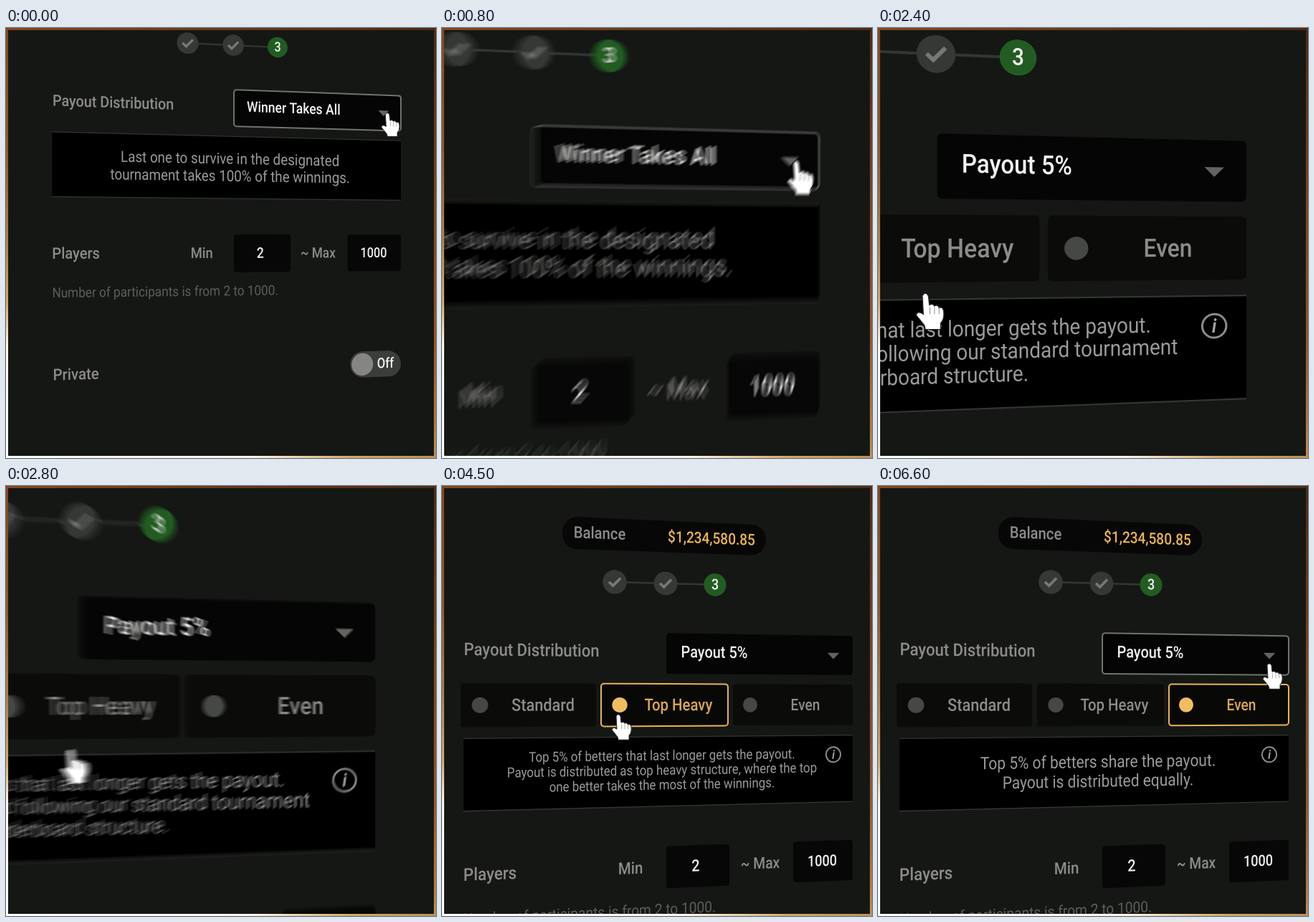
An HTML page with a canvas that plays this animation: 600x600 px, repeating every 6.7 s.

```html
<!DOCTYPE html>
<html lang="en">
<head>
<meta charset="utf-8">
<title>Payout settings</title>
<style>
html, body { margin: 0; height: 100%; overflow: hidden; background: #151714; }
canvas { display: block; }
</style>
</head>
<body>
<canvas id="stage" width="600" height="600"></canvas>
<script>
const LOOP = 6700, SHUTTER = 32, SAMPLES = 12;
const TILT = 0.00017, CONDENSE = 0.88;
const GOLD = '#e9b355', GREY = '#8c8c8a', WHITE = '#f2f2f0';

const out = document.getElementById('stage').getContext('2d');
const buffer = document.createElement('canvas');
buffer.width = buffer.height = 600;
const c = buffer.getContext('2d');

const lerp = (a, b, p) => a + (b - a) * p;
function ease(t, from, to) {
  const u = Math.min(1, Math.max(0, (t - from) / (to - from)));
  return u < 0.5 ? 2 * u * u : 1 - 2 * (1 - u) ** 2;
}

// Camera views: x scale, y scale, right edge and middle of the dropdown on screen
const WIDE = [0.896, 0.896, 551, 111];
const CLOSE = [1.659, 1.54, 514, 196.5];
const FULL = [1, 1, 573, 233.5];

// Pointer moves: start, end, x, y
const MOVES = [
  [1600, 2100, 303, 344],
  [3100, 3600, 246, 318],
  [4550, 5050, 471, 322],
  [5950, 6400, 546, 245]
];

function pose(t) {
  const zoomIn = ease(t, 335, 1000), zoomOut = ease(t, 2690, 3130);
  const blend = (a, b, p) => a.map((v, i) => lerp(v, b[i], i === 2 ? p * p : p));
  const view = zoomOut > 0 ? blend(CLOSE, FULL, zoomOut) : blend(WIDE, CLOSE, zoomIn);
  let x = 552, y = 233;
  for (const [from, to, nx, ny] of MOVES) {
    const p = ease(t, from, to);
    x = lerp(x, nx, p);
    y = lerp(y, ny, p);
  }
  return [...view, x, y];
}

let sx, sy, ox, oy;
const depthAt = x => 1 - TILT * (x - 300);

function project(x, y) {
  const px = ox + sx * x, flat = oy + sy * y - 300, depth = depthAt(px);
  return { px, py: 300 + flat * depth, flat, depth };
}

// Puts the origin at a point of the tilted panel; widths shrink towards its far side
function at(x, y, squeeze = 1) {
  const { px, py, flat, depth } = project(x, y);
  const a = sx * depthAt(x) ** 2 * squeeze;
  c.setTransform(a, -TILT * flat * a, 0, sy * depth, px, py);
}

function text(str, x, y, size, color, weight = 500, style = '') {
  at(x, y, CONDENSE);
  c.font = `${style} ${weight} ${size}px Roboto, "Liberation Sans", sans-serif`;
  c.fillStyle = color;
  c.fillText(str, 0, 0);
}

function box(x0, y0, x1, y1, r, fill, stroke) {
  const pts = [[x0, y0], [x1, y0], [x1, y1], [x0, y1]].map(p => project(...p));
  c.resetTransform();
  c.beginPath();
  c.moveTo((pts[0].px + pts[1].px) / 2, (pts[0].py + pts[1].py) / 2);
  for (let i = 1; i <= 4; i++) {
    const p = pts[i % 4], q = pts[(i + 1) % 4];
    c.arcTo(p.px, p.py, q.px, q.py, r * sx);
  }
  c.closePath();
  c.fillStyle = fill;
  c.fill();
  if (stroke) {
    c.lineWidth = 2;
    c.strokeStyle = stroke;
    c.stroke();
  }
}

function line(points, color, width) {
  c.beginPath();
  points.forEach(p => c.lineTo(...p));
  c.strokeStyle = color;
  c.lineWidth = width;
  c.stroke();
}

// Horizontal rule on the panel
function rule(x0, x1, y, width) {
  const a = project(x0, y), b = project(x1, y);
  c.resetTransform();
  line([[a.px, a.py], [b.px, b.py]], '#343634', width * sx);
}

function dot(x, y, r, fill) {
  at(x, y);
  c.beginPath();
  c.arc(0, 0, r, 0, 7);
  c.fillStyle = fill;
  c.fill();
}

function tick(x, y, size, color) {
  at(x, y);
  line([[-size, 0], [-size * 0.3, size * 0.65], [size, -size * 0.7]], color, size * 0.45);
}

function header() {
  box(168, 48, 452, 92, 21, '#060706');
  text('Balance', 220, 70, 22.4, GREY);
  text('$1,234,580.85', 376, 71, 22.2, GOLD);
  rule(241, 381, 135.6, 2.5);
  for (const x of [241, 312]) {
    dot(x, 135.6, 16.5, '#363836');
    tick(x, 135.6, 8, '#777976');
  }
  dot(381, 135.6, 16, '#235c22');
  text('3', 381, 136, 21, WHITE);
}

function dropdown(s) {
  text('Payout Distribution', 125, 232, 23.7, GREY);
  box(313, 205, 573, 262, 4, '#040504', s.focus && '#70726f');
  if (s.split) text('Payout 5%', 380, 232, 23.3, WHITE);
  else text('Winner Takes All', 406, 232, 23.1, WHITE);
  const d = s.open ? -4.5 : 4.5;
  at(546, 234.5);
  c.beginPath();
  c.moveTo(-9, -d);
  c.lineTo(9, -d);
  c.lineTo(0, d);
  c.fillStyle = '#62645f';
  c.fill();
}

function menu() {
  box(312, 265, 573, 425, 0, '#242624');
  box(312, 267, 573, 319.5, 0, '#371414');
  text('Winner Takes All', 406, 293, 23.1, '#d9a95a');
  tick(546, 293, 8, '#e6c27c');
  text('Payout 5%', 380, 346.5, 23.3, GREY);
  text('Payout 20%', 385.5, 399.5, 23.3, GREY);
}

// left, right, dot x, label x, label
const MODES = [
  [26, 215, 53, 141, 'Standard'],
  [222, 399, 248, 330, 'Top Heavy'],
  [406, 573, 430, 507, 'Even']
];

function modes(s) {
  MODES.forEach(([x0, x1, dx, tx, label], i) => {
    const on = i === s.mode;
    const border = on ? GOLD : i === s.hover && '#636562';
    box(x0, 276, x1, 335, 4, on ? '#080907' : '#0b0c0a', border);
    dot(dx, 305.5, 10.5, on ? '#f0bd62' : '#464846');
    text(label, tx, 306.5, 23.4, on ? '#dba94f' : GREY);
  });
}

const LEAD = 'Top 5% of betters that last longer gets the payout.';
const NOTES = [
  [LEAD, 'Payout is distributed following our standard tournament', 'leaderboard structure.'],
  [LEAD, 'Payout is distributed as top heavy structure, where the top', 'one better takes the most of the winnings.'],
  ['Top 5% of betters share the payout.', 'Payout is distributed equally.']
];
const WINNER_NOTE = ['Last one to survive in the designated', 'tournament takes 100% of the winnings.'];

function note(s, top) {
  box(30, top, 573, top + 97, 0, '#000');
  for (const y of [top, top + 97]) rule(30, 573, y, 1.3);
  const lines = s.split ? NOTES[s.mode] : WINNER_NOTE;
  const [size, gap, first] = lines.length > 2 ? [19.2, 20.5, 27] : [23.9, 27, 36];
  lines.forEach((str, i) => text(str, 307, top + first + i * gap, size, '#9a9a98', 400));
  if (!s.split) return;
  at(546, top + 28);
  c.beginPath();
  c.arc(0, 0, 11, 0, 7);
  c.strokeStyle = '#8c8c8a';
  c.lineWidth = 2;
  c.stroke();
  text('i', 546, top + 29, 18, '#a4a4a2', 700, 'italic');
}

function limits(y) {
  text('Players', 67, y, 23.6, GREY);
  text('Min', 263, y, 23, GREY);
  box(313, y - 30, 401, y + 29, 4, '#060706');
  text('2', 354, y, 23, WHITE);
  text('~ Max', 444, y, 23, GREY);
  box(490, y - 30, 573, y + 29, 4, '#060706');
  text('1000', 530.5, y, 22.3, WHITE);
  text('Number of participants is from 2 to 1000.', 206, y + 59, 21.1, '#5c5e5b', 400);
  text('Private', 67, y + 182, 24, GREY);
  box(494, y + 158, 573, y + 200, 20, '#3b3d3b');
  dot(513, y + 179, 18, '#858683');
  text('Off', 549, y + 179, 23, WHITE);
}

function hand(x, y) {
  const { px, py } = project(x, y), g = sx ** 0.7;
  c.setTransform(g, 0, 0, g, px, py);
  c.beginPath();
  c.moveTo(-3, 3);
  c.quadraticCurveTo(0, -2, 3, 3);
  c.lineTo(4, 12);
  c.quadraticCurveTo(7, 10, 9, 13);
  c.quadraticCurveTo(12, 11, 13.5, 15);
  c.quadraticCurveTo(17, 13, 18, 18);
  c.quadraticCurveTo(19, 26, 15, 30);
  c.lineTo(15, 36);
  c.lineTo(0, 36);
  c.lineTo(-1, 32);
  c.lineTo(-9, 22);
  c.quadraticCurveTo(-8, 17, -2, 21);
  c.closePath();
  c.fillStyle = '#fff';
  c.fill();
  c.strokeStyle = '#222';
  c.lineWidth = 1;
  c.stroke();
  for (const fx of [4.5, 9, 13.5]) line([[fx, 14], [fx, 21]], '#999', 0.8);
}

function scene([kx, ky, right, mid, x, y], s) {
  [sx, sy, ox, oy] = [kx, ky, right - kx * 573, mid - ky * 233.5];
  c.resetTransform();
  c.fillStyle = '#151714';
  c.fillRect(0, 0, 600, 600);
  c.textAlign = 'center';
  c.textBaseline = 'middle';
  const shift = s.split ? 72 : 0;
  header();
  dropdown(s);
  if (s.split) modes(s);
  note(s, 278 + shift);
  limits(461 + shift);
  if (s.open) menu();
  hand(x, y);
}

function state(t) {
  return {
    split: t >= 2400,
    open: t >= 1200 && t < 2400,
    focus: t < 2400 || t >= 6250,
    mode: t < 4050 ? 0 : t < 5550 ? 1 : 2,
    hover: t >= 3450 && t < 4050 ? 1 : t >= 4850 && t < 5550 ? 2 : -1
  };
}

const rim = out.createLinearGradient(0, 600, 325, -123);
[[0, '#fff'], [0.18, '#fff6e8'], [0.25, '#d2a869'], [0.35, '#b08045'], [0.5, '#935624'], [0.7, '#83461a'], [1, '#4a2a14']]
  .forEach(([p, color]) => rim.addColorStop(p, color));

// Averages several moments around t into motion blur
function draw(t) {
  const s = state(t), half = SHUTTER / 2;
  const still = String(pose(t - half)) === String(pose(t + half));
  const n = still ? 1 : SAMPLES;
  for (let i = 0; i < n; i++) {
    scene(pose(still ? t : t - half + SHUTTER * i / (n - 1)), s);
    out.globalAlpha = 1 / (i + 1);
    out.drawImage(buffer, 0, 0);
  }
  out.globalAlpha = 1;
  out.strokeStyle = rim;
  out.lineWidth = 3;
  out.strokeRect(1.5, 1.5, 597, 597);
}

const start = performance.now();
function loop() {
  draw((performance.now() - start) % LOOP);
  requestAnimationFrame(loop);
}
loop();
</script>
</body>
</html>
```
